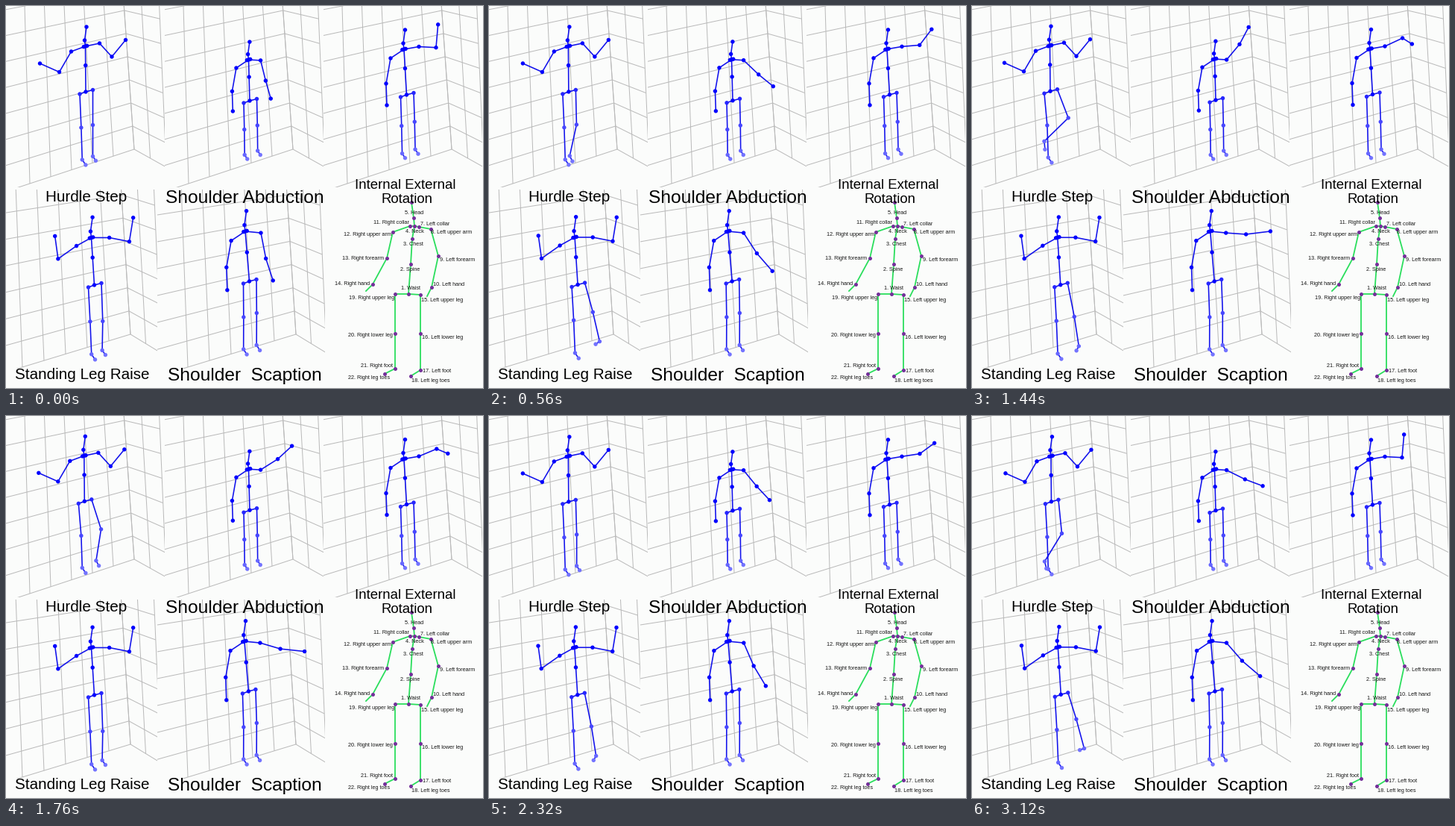
A matplotlib script that plays this animation: 640x512 px, repeating every 3.2 s.

```python
import numpy as np
import matplotlib.pyplot as plt
from matplotlib.animation import FuncAnimation
from matplotlib.collections import LineCollection
from matplotlib.patches import Rectangle

W, H, DPI = 640, 512, 100
N, STEP = 40, 80
PX = 72 / DPI
T = np.arange(N) * STEP
PAPER = "#fbfcfb"

plt.rcParams["font.family"] = "Liberation Sans"
fig = plt.figure(figsize=(W / DPI, H / DPI), dpi=DPI, facecolor=PAPER)
ax = fig.add_axes([0, 0, 1, 1])
ax.set_xlim(0, W)
ax.set_ylim(H, 0)
ax.axis("off")


# ---- 3D room grids ----
def wall(near, far, rows, cols, extend=0.0):
    """Grid lines between two upright edges, each given as (top, bottom)."""
    near, far = np.array(near, float), np.array(far, float)

    def at(u, v):
        top, bottom = (1 - u) * near + u * far
        return (1 - v) * top + v * bottom

    lines = [[at(-extend, v), at(1, v)] for v in np.linspace(0, 1, rows + 1)]
    return lines + [[at(u, 0), at(u, 1)] for u in np.linspace(0, 1, cols + 1)]


def room(x, y, w, h, dx, left, corner, right):
    clip = Rectangle((x, y), w, h, fc="none", ec="none")
    ax.add_patch(clip)
    lines = wall(left, corner, 7, 5, 0.3) + wall(corner, right, 7, 2)
    grid = LineCollection(np.array(lines) + [dx, 0], colors="#bababa",
                          linewidths=PX, zorder=1)
    ax.add_collection(grid)
    grid.set_clip_path(clip)


for x in (0, 213, 426):
    room(x, 0, 213, 243, x, [(25, 0), (32, 238)],
         [(156.5, -25), (172, 192)], [(205, -16), (215, 216)])
for x, w, dx in ((0, 203, 0), (203, 225, 222)):
    room(x, 246, w, 240, dx, [(13, 240), (22, 484)],
         [(153, 222), (167, 440)], [(198, 234), (208, 465)])


# ---- motion ----
def ease(*keys):
    """Cosine easing through (ms, value) keys, sampled per frame."""
    t, v = np.array(keys, float).T
    i = np.clip(np.searchsorted(t, T, "right") - 1, 0, len(t) - 2)
    s = np.clip((T - t[i]) / (t[i + 1] - t[i]), 0, 1)
    return v[i] + (v[i + 1] - v[i]) * (1 - np.cos(np.pi * s)) / 2


def bone(angles, lengths, turn, stretch=None):
    """Offset per frame of a bone that turns and foreshortens."""
    a = np.radians(angles[0] + (angles[1] - angles[0]) * turn)
    stretch = turn if stretch is None else stretch
    size = lengths[0] + (lengths[1] - lengths[0]) * stretch
    return np.column_stack([size * np.cos(a), size * np.sin(a)])


# Joints: head, skull, neck, chest, waist, right arm x3, left arm x3,
# right hip/knee/ankle/toe, left hip/knee/ankle/toe, two collars
CHAINS = ([0, 1, 2, 3, 4], [7, 6, 5, 2, 8, 9, 10],
          [14, 13, 12, 11, 4, 15, 16, 17, 18])
SHADE = np.array([1.0] * 11 + [0.85, 0.72, 0.6, 0.55] * 2 + [1.0] * 2)
BLUE = np.column_stack([1 - SHADE, 1 - SHADE, np.ones_like(SHADE)])

HANGING = [(-18, 12), (-24, 46), (-23, 75)]
HIPS = np.array([(-8, 3), (9.5, -2.5)])
LEG = np.array([(1, 45), (1.5, 88), (6, 95)])
COLLAR = np.array([2.2, -0.6])


class Body:
    def __init__(self, neck, waist, bones, lift, sway, left, right=HANGING,
                 size=1.0, leg=1.0, lean=0.0, stance=(0, 0)):
        neck, waist = np.array(neck, float), np.array(waist, float)
        top = neck + size * np.array([(1.5, -26), (-1, -8), (0, 0)])
        arms = neck + size * np.array(right + left)
        shin = leg * LEG + np.outer(leg * LEG[:, 1], [lean, 0])
        hips = waist + HIPS
        spare = np.zeros((3 - len(left), 2))
        base = np.vstack([top, neck + 0.42 * (waist - neck), waist, arms, spare,
                          hips[0], hips[0] + shin, hips[1], hips[1] + shin])
        pose = np.repeat(base[None], N, axis=0)
        planted = [12, 13, 14, 16, 17, 18]
        shift = lift[:, None, None]
        pose += shift * np.array(sway)
        pose[:, planted] = base[planted]
        pose[:, 12:15] += shift * np.array(stance)
        # A three-bone limb hangs from the left hip, a two-bone one from the shoulder.
        root = 15 if len(bones) == 3 else 8
        for j, offset in enumerate(bones, root):
            pose[:, j + 1] = pose[:, j] + offset
        collars = [pose[:, 2:3] + COLLAR, pose[:, 2:3] - COLLAR]
        self.pose = np.concatenate([pose, *collars], axis=1)
        self.lines = [ax.plot([], [], color="#1212ec", lw=1.6 * PX, zorder=3)[0]
                      for _ in CHAINS]
        self.dots = ax.scatter(*self.pose[0].T, s=(5.4 * PX) ** 2, c=BLUE,
                               linewidths=0, zorder=4)

    def draw(self, f):
        p = self.pose[f]
        for line, chain in zip(self.lines, CHAINS):
            line.set_data(*p[chain].T)
        self.dots.set_offsets(p)
        return [*self.lines, self.dots]


def hurdle_step():
    lift = ease((400, 0), (1400, 1), (1500, 1), (2500, 0), (2700, 0), (3900, 1))
    fold = ease((380, 0), (900, 1), (1420, 1), (1900, 0), (2760, 0), (3340, 1))
    bones = [bone((90, 69), (47, 41), lift), bone((90, 136), (42, 45), fold),
             bone((56, 85), (7, 11), fold)]
    return Body((106.5, 54), (107, 115), bones, lift, (-2, -0.8),
                [(19, -4), (35.5, 14), (54, -8.5)],
                [(-19, 7), (-35, 34.5), (-61, 23)], lean=0.02, stance=(0, -3))


def shoulder_abduction():
    lift = ease((140, 0), (1380, 1), (1460, 1), (2680, 0), (3700, 1))
    bones = [bone((76, -50), (28, 27), lift), bone((74, -62), (25, 26), lift)]
    return Body((325.5, 72), (327, 127), bones, lift, (0, -0.9),
                [(17.5, 1)], size=0.92, leg=0.79)


def internal_external_rotation():
    lift = ease((60, 0), (1480, 1), (3000, 0))
    bones = [bone((3, -25), (23, 26), lift), bone((-85, 32), (31, 15), lift)]
    return Body((534, 58), (537.5, 119), bones, lift, (0, -0.5),
                [(20, -3.5)], leg=0.86, lean=0.01)


def standing_leg_raise():
    lift = ease((150, 0), (980, 1), (1660, 0), (2080, 0), (2800, 1), (3600, 0))
    swing = np.sqrt(lift)
    bones = [bone((88, 69), (51, 30), swing, lift),
             bone((91, 71), (39, 41), swing),
             bone((55, 185), (7.5, 6), swing)]
    return Body((114.5, 310.5), (118.5, 374), bones, lift, (1.2, -1),
                [(23, 0), (48.5, 5), (53.5, -25.5)],
                [(-19, 10.5), (-42.5, 27), (-46.5, -2)],
                size=1.05, leg=1.02, lean=0.03, stance=(1.5, -3.5))


def shoulder_scaption():
    lift = ease((80, 0), (1400, 1), (1440, 1), (2640, 0), (3740, 1))
    bones = [bone((79, 4), (35, 27), lift), bone((72, -7), (31, 33), lift)]
    return Body((321, 302), (326.5, 369), bones, lift, (-1.3, 0),
                [(20, 2)], size=1.05, lean=-0.015)


bodies = [hurdle_step(), shoulder_abduction(), internal_external_rotation(),
          standing_leg_raise(), shoulder_scaption()]

# ---- joint legend: name, joint, label offset; numbered in order ----
JOINTS = [
    ("Waist", (540, 386), (3, -8)), ("Spine", (543, 346), (-1, 7)),
    ("Chest", (545, 312), (1, 7)), ("Neck", (548, 295), (0, 7)),
    ("Head", (547, 284), (1, -7)), ("", (544, 263), (0, 0)),
    ("Left collar", (554, 296), (2, -4)), ("Left upper arm", (570, 299), (0, 4)),
    ("Left forearm", (580, 335), (2, 5)), ("Left hand", (571, 377), (2, -4)),
    ("Right collar", (542, 295), (-1, -5)), ("Right upper arm", (519, 303), (-2, 3)),
    ("Right forearm", (511, 338), (-4, 0)), ("Right hand", (492, 373), (-4, -1)),
    ("Left upper leg", (556, 387), (1, 7)), ("Left lower leg", (556, 439), (2, 5)),
    ("Left foot", (556, 488), (3, 1)), ("Left leg toes", (543, 496), (1, 6)),
    ("Right upper leg", (522, 386), (-1, 5)), ("Right lower leg", (522, 439), (-3, 2)),
    ("Right foot", (522, 486), (-3, -4)), ("Right leg toes", (508, 493), (7, 5)),
]
SIDE = {"Left": "left", "Right": "right"}
spot = {}
for n, (name, (x, y), (dx, dy)) in enumerate(JOINTS, 1):
    spot[n] = (x, y)
    if name:
        ax.text(x + dx, y + dy + 2.2, f"{n}. {name}", size=7.3 * PX,
                color="#161616", ha=SIDE.get(name.split()[0], "center"),
                va="baseline", zorder=5)
ax.scatter(*zip(*spot.values()), s=(5 * PX) ** 2, c="#74309a", linewidths=0, zorder=4)

spot["right tip"], spot["left tip"] = (483, 382), (565, 389)
for chain in ([6, 5, 4, 3, 2, 1],
              ["right tip", 14, 13, 12, 11, 4, 7, 8, 9, 10, "left tip"],
              [22, 21, 20, 19, 1, 15, 16, 17, 18]):
    ax.plot(*zip(*(spot[k] for k in chain)), color="#2ade5c", lw=1.8 * PX, zorder=3)

SMALL, MEDIUM, LARGE = 18.6, 20.6, 24.5
TITLES = [
    (107.5, 262, MEDIUM, "Hurdle Step"), (320, 264, LARGE, "Shoulder Abduction"),
    (535.5, 245, SMALL, "Internal External"), (538, 264, SMALL, "Rotation"),
    (102.5, 500, MEDIUM, "Standing Leg Raise"),
    (320, 502, LARGE, "Shoulder  Scaption"),
]
for x, y, size, title in TITLES:
    ax.text(x, y, title, size=size * PX, color="black", ha="center",
            va="baseline", zorder=6)


def update(f):
    return [artist for body in bodies for artist in body.draw(f)]


anim = FuncAnimation(fig, update, frames=N, interval=STEP, repeat=True,
                     repeat_delay=0, blit=False)
plt.show()
```
